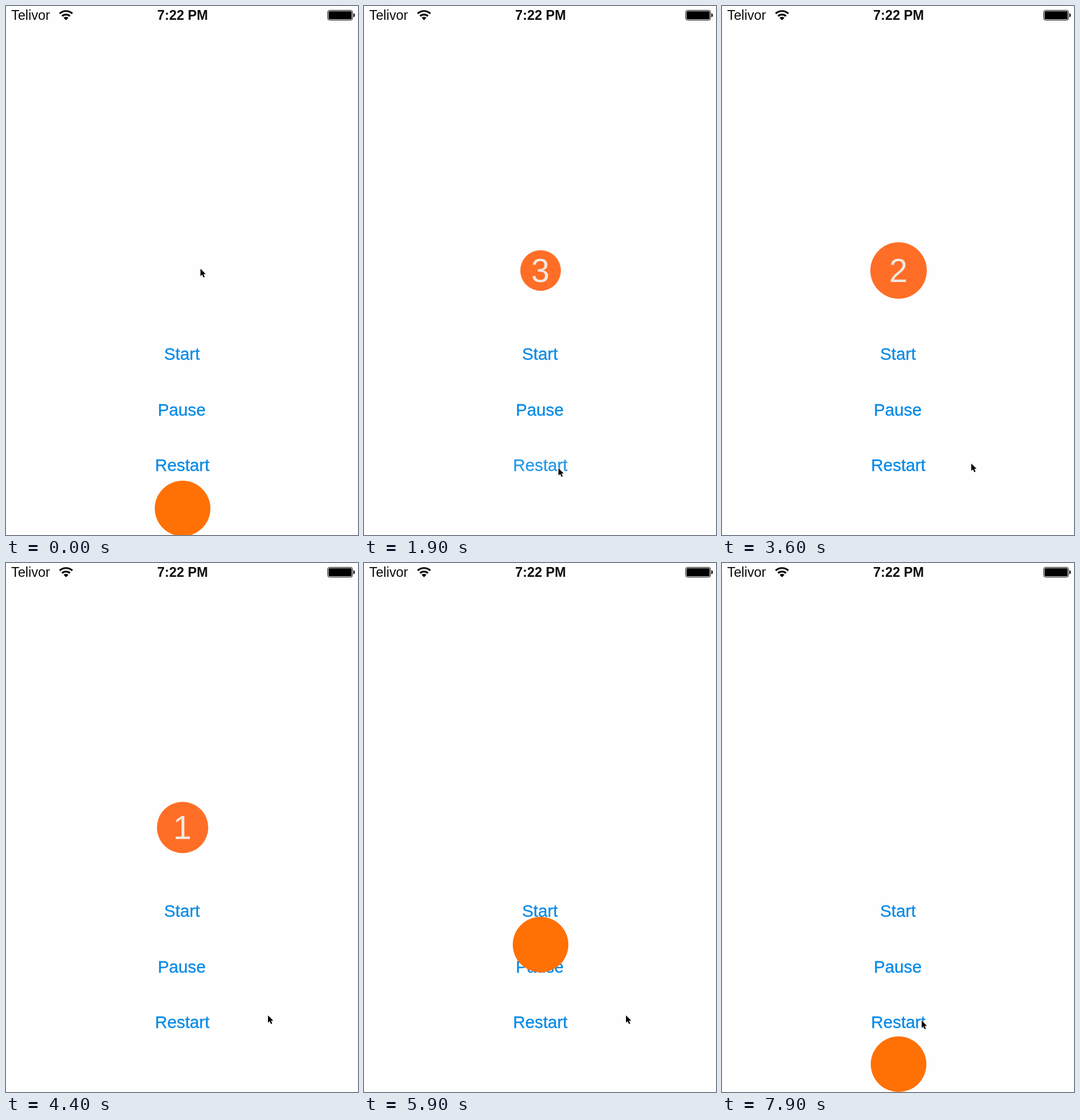
These frames come from a looping animation (610 by 918 pixels, 8000 ms). An HTML page:

```html
<!DOCTYPE html>
<html lang="en">
<head>
<meta charset="utf-8">
<title>Countdown</title>
<style>
  html, body { margin: 0; width: 100%; height: 100%; overflow: hidden; background: #fefefe; }
  svg { display: block; font-family: "Liberation Sans", Arial, sans-serif; }
  .status { font-size: 23.3px; fill: #0c0c0c; }
  .button { font-size: 29.3px; fill: #078ae6; stroke: #078ae6; stroke-width: .35; text-anchor: middle; }
</style>
</head>
<body>
<svg width="610" height="918" viewBox="0 0 610 918">
  <rect width="610" height="918" fill="#fefefe"/>

  <g class="status">
    <text x="9" y="24">Telivor</text>
    <text x="306" y="24" text-anchor="middle" font-weight="bold">7:22 PM</text>
    <g fill="none" stroke="#0c0c0c" stroke-width="3.2">
      <path d="M93 13.2A15.8 15.8 0 0 1 115 13.2"/>
      <path d="M97.2 17.6A9.8 9.8 0 0 1 110.8 17.6"/>
    </g>
    <path d="M104 24.8L99.8 20.4A6 6 0 0 1 108.2 20.4Z"/>
    <rect x="557.5" y="7.5" width="43" height="17" rx="3" fill="none" stroke="#000"/>
    <rect x="559" y="9" width="40" height="14" rx="1.5" fill="#000"/>
    <path d="M602 12.5Q604.5 13 604.5 16T602 19.5Z"/>
  </g>

  <g class="button">
    <text x="305" y="614">Start</text>
    <text x="304.5" y="711">Pause</text>
    <text x="305.5" y="807" id="restart">Restart</text>
  </g>

  <circle id="ball" cx="306"/>
  <text id="digit" x="305.5" y="479" font-size="57" fill="#f0e8e2" text-anchor="middle"></text>
  <path id="cursor" d="M0 0V12.8L3 10.1L5.1 15L7.4 14L5.2 9.3H9.2Z"
        fill="#000" stroke="#fff" stroke-width="1.4" paint-order="stroke"/>
</svg>

<script>
const LOOP = 8000, STEP = 100;
const PRESS = 1300, RELEASE = 1650, DROP = 4910;
const COUNT = (DROP - RELEASE) / 3, DROP_TIME = 3200, FADE = 300;
const TOP = 610, FLOOR = 872;

const home = { x: 337, y: 456 };
const glides = [
  { from: 300, to: 1200, x: 337, y: 802, bow: 62 },
  { from: 2700, to: 3200, x: 432, y: 794, bow: 0 },
  { from: 3800, to: 4100, x: 454, y: 785, bow: 0 },
  { from: 6200, to: 6700, x: 358, y: 793, bow: 0 },
  { from: 7000, to: 7300, x: 346, y: 794, bow: 0 }
];

const [restart, ball, digit, cursor] =
  ["restart", "ball", "digit", "cursor"].map(id => document.getElementById(id));

const clamp = v => Math.min(1, Math.max(0, v));
const mix = (a, b, p) => a + (b - a) * p;
const progress = (t, from, to) => clamp((t - from) / (to - from));

// cubic-bezier(.42, 0, .58, 1)
function easeInOut(x) {
  let low = 0, high = 1;
  for (let i = 0; i < 24; i++) {
    const s = (low + high) / 2, r = 1 - s;
    if (1.26 * s * r * r + 1.74 * s * s * r + s ** 3 < x) low = s; else high = s;
  }
  return low * low * (3 - 2 * low);
}

// Each glide starts where the last one ended; bow bends it sideways.
function pointerAt(t) {
  return glides.reduce((at, glide) => {
    const p = progress(t, glide.from, glide.to);
    return {
      x: mix(at.x, glide.x, p) + glide.bow * Math.sin(Math.PI * p),
      y: mix(at.y, glide.y, p)
    };
  }, home);
}

function setBall(y, radius, color) {
  ball.setAttribute("cy", y);
  ball.setAttribute("r", radius);
  ball.setAttribute("fill", color);
}

function draw(t) {
  const counting = t >= RELEASE && t < DROP;
  if (counting) {
    const elapsed = (t - RELEASE) / COUNT, phase = elapsed % 1;
    setBall(459, mix(25, 50, 1 - (1 - phase) ** 2), "#ff6e26");
    digit.textContent = 3 - Math.floor(elapsed);
  } else {
    const fall = t < RELEASE ? 1 : easeInOut(progress(t, DROP, DROP + DROP_TIME));
    setBall(mix(TOP, FLOOR, fall), 48.2, "#ff7005");
    digit.textContent = "";
  }
  restart.setAttribute("opacity", t < PRESS ? 1 : mix(0.2, 1, progress(t, RELEASE, RELEASE + FADE)));
  const { x, y } = pointerAt(t);
  cursor.setAttribute("transform", `translate(${x} ${y})`);
}

const start = performance.now();
function tick() {
  const t = (performance.now() - start) % LOOP;
  draw(Math.floor(t / STEP) * STEP);
  requestAnimationFrame(tick);
}
tick();
</script>
</body>
</html>
```
